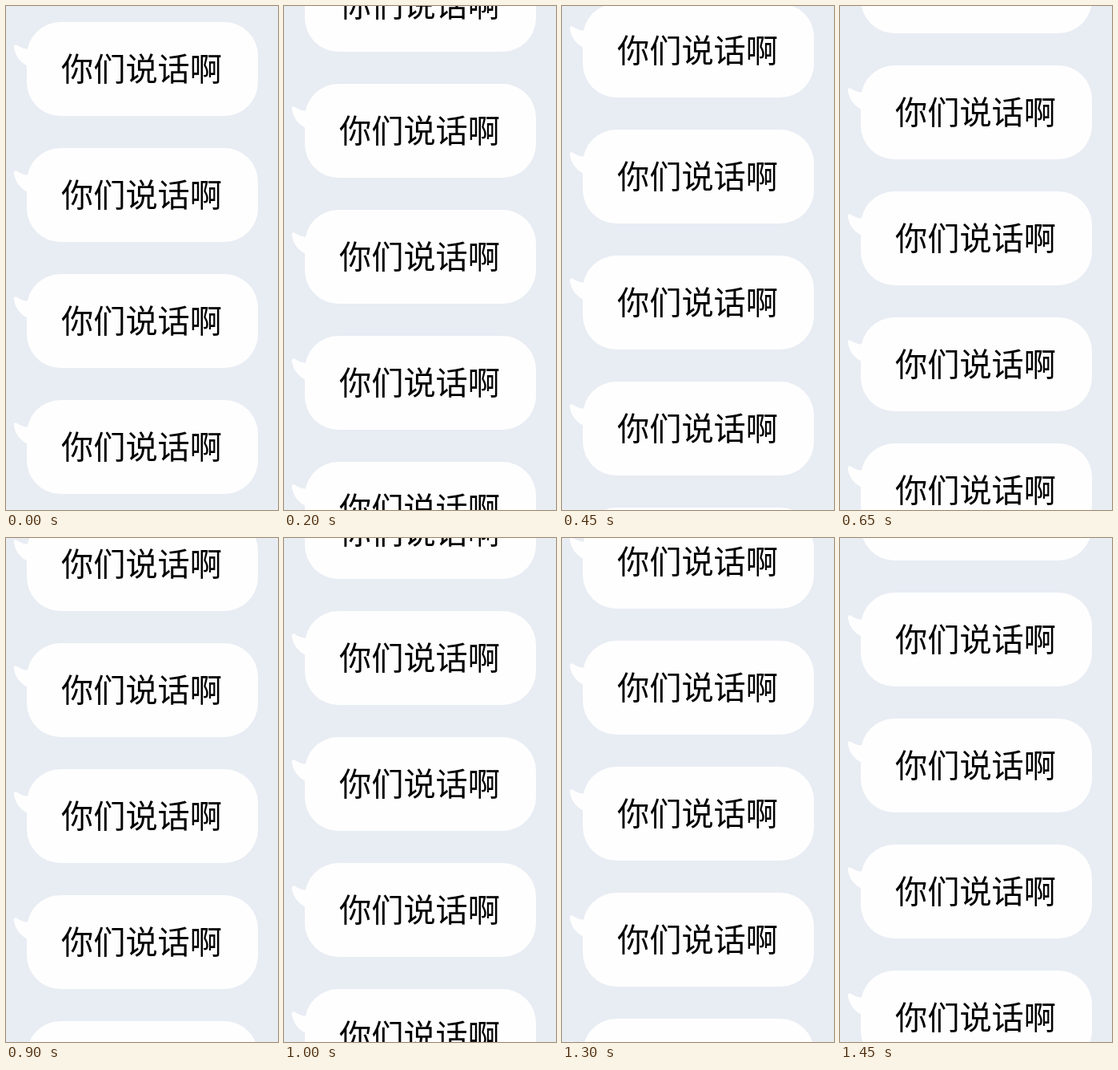
Recreate the animation shown at these times as an HTML page. Size 340 by 628 pixels, loop 1500 ms.

```html
<!DOCTYPE html>
<html lang="zh-CN">
<head>
<meta charset="utf-8">
<style>
  html, body { margin: 0; width: 340px; height: 628px; overflow: hidden; background: #e8ecf3; }
  svg { display: block; }
  text { font: 40.2px "Noto Sans CJK SC", "Noto Sans CJK", sans-serif; }
</style>
</head>
<body>
<svg width="340" height="628">
  <defs>
    <g id="bubble">
      <g fill="#fefefe">
        <rect x="26" width="289" height="117" rx="42"/>
        <path d="M32 34Q21 34 13 28.5Q9 27 10 33Q13 48 27 55Z"/>
      </g>
      <text x="69" y="73">你们说话啊</text>
    </g>
  </defs>
  <g id="list"></g>
</svg>
<script>
  const LOOP = 1500, STEP = 50, SPEED = 20, PITCH = 157, TOP = 20;
  const list = document.getElementById('list');
  for (let i = 0; i < 5; i++) {
    list.innerHTML += `<use href="#bubble" y="${TOP + i * PITCH}"/>`;
  }

  function draw(now) {
    const step = Math.floor(now % LOOP / STEP);
    list.setAttribute('transform', `translate(0 ${-(step * SPEED % PITCH)})`);
    requestAnimationFrame(draw);
  }
  draw(performance.now());
</script>
</body>
</html>
```
